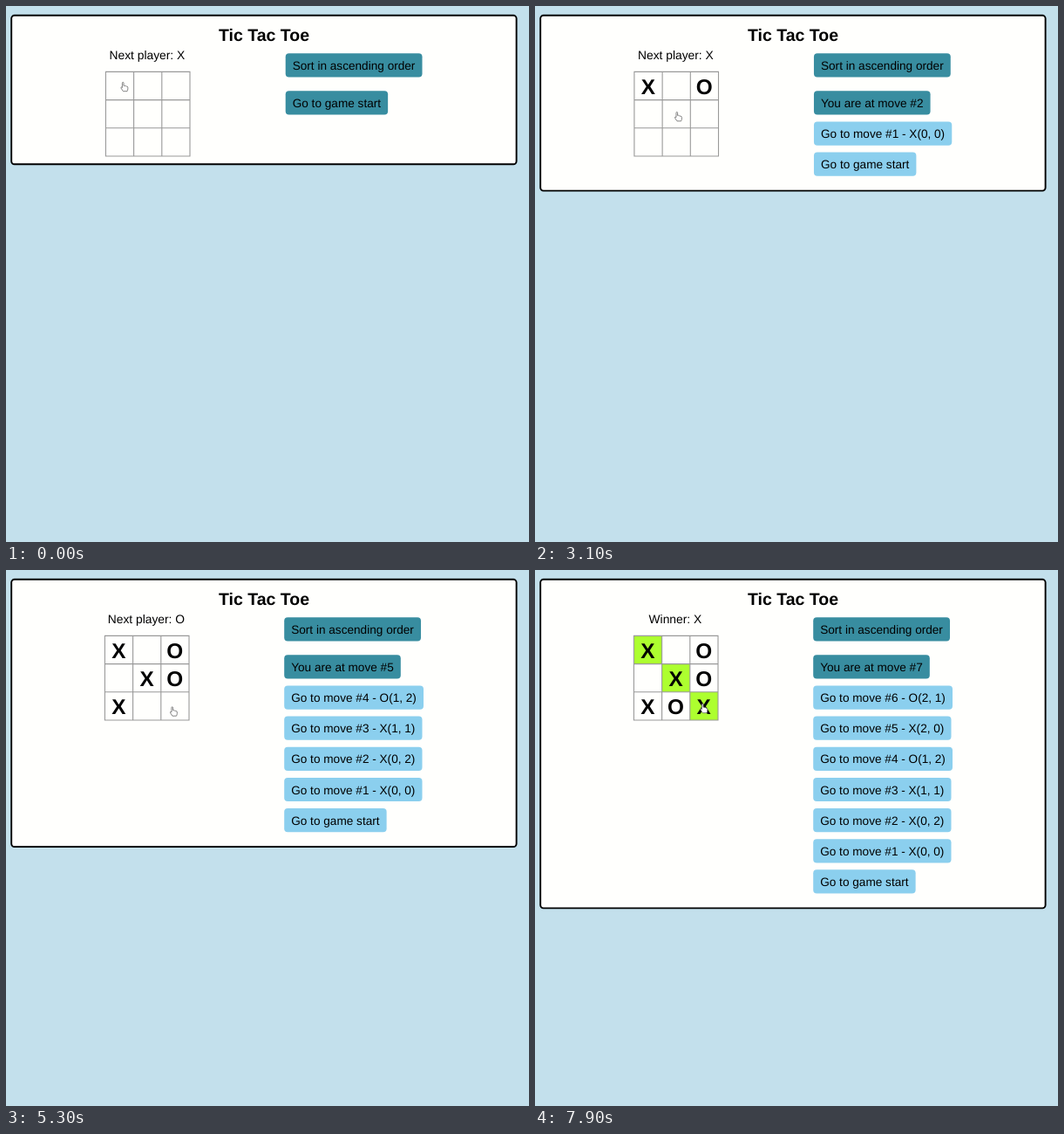
An HTML page that plays this animation: 600x614 px, repeating every 8 s.

```html
<!DOCTYPE html>
<html lang="en">
<head>
<meta charset="utf-8">
<title>Tic Tac Toe</title>
<style>
  html, body { margin: 0; width: 100%; height: 100%; overflow: hidden; background: #c3e0ec; }
  svg { display: block; }
  text { font: 13.62px "Liberation Sans", Arial, sans-serif; fill: #000; text-rendering: geometricPrecision; }
  .title { font-size: 19.5px; font-weight: bold; text-anchor: middle; }
  .mark { font-size: 24.3px; font-weight: bold; text-anchor: middle; }
  .status { font-size: 13.8px; text-anchor: middle; }
  .panel { fill: #fffffd; stroke: #000; stroke-width: 1.9; }
  .grid { fill: none; stroke: #999; stroke-width: 1.1; }
  .win { fill: #adff2f; }
  .on { fill: #388da0; }
  .off { fill: #8bcfee; }
  .hand { fill: #fff; stroke: #666; stroke-width: .8; stroke-linejoin: round; }
</style>
</head>
<body>
<svg width="600" height="614" viewBox="0 0 600 614">
  <g id="game"></g>
  <path id="hand" class="hand" d="M-2.6 1V-4.2Q-2.6 -5.2 -1.8 -5.2T-1 -4.2V-1.2Q.2 -1.8 .7 -.8Q1.8 -1.3 2.3 -.3Q3.8 -.6 3.8 .8V2.4Q3.8 3.8 3 5.2H-1.6L-4 1.6Q-4.4 .4 -3.4 .4Z"/>
</svg>
<script>
const LOOP = 8000, STEP = 100;
const LEFT = 114.4, TOP = 75.4, CELL = 32.2, ROW = 35.15;

// the pointer glides from stop to stop and clicks the square it reaches
const stops = [
  { t: 0, x: 136, y: 92.5 },
  { t: 1600, x: 132.5, y: 94.6, click: true },
  { t: 2100, x: 184.3, y: 109.7, click: true },
  { t: 3300, x: 163, y: 128, click: true },
  { t: 3900, x: 201, y: 129.5, click: true },
  { t: 5000, x: 131, y: 161, click: true },
  { t: 5300, x: 192.5, y: 162, },
  { t: 6700, x: 152.5, y: 165, click: true },
  { t: 7400, x: 194, y: 158.5, click: true }
];
const moves = stops.filter(s => s.click).map(s => ({
  t: s.t,
  row: Math.floor((s.y - 5 - TOP) / CELL),
  col: Math.floor((s.x - 2 - LEFT) / CELL)
}));

const game = document.getElementById('game');
const hand = document.getElementById('hand');

const text = (x, y, s, cls = '') => `<text class="${cls}" x="${x}" y="${y}">${s}</text>`;
const rect = (x, y, w, h, cls, r = 0) =>
  `<rect class="${cls}" x="${x}" y="${y}" width="${w}" height="${h}" rx="${r}"/>`;

const ruler = document.createElement('canvas').getContext('2d');
ruler.font = '100px "Liberation Sans", Arial, sans-serif';
const measure = s => ruler.measureText(s).width * .1362;

const button = (x, y, s, cls) =>
  rect(x, y, measure(s) + 16, 27.2, cls, 4) + text(x + 8, y + 18.6, s);

function board(n, x) {
  const won = n === moves.length;
  let out = '', lines = '';
  if (won) for (let i = 0; i < 3; i++) out += rect(x + i * CELL, TOP + i * CELL, CELL, CELL, 'win');
  for (let i = 0; i < 4; i++) {
    const d = i * CELL;
    lines += `M${x + d} ${TOP - .5}v${3 * CELL + 1}M${x - .5} ${TOP + d}h${3 * CELL + 1}`;
  }
  out += `<path class="grid" d="${lines}"/>`;
  moves.slice(0, n).forEach(({ row, col }, i) => {
    out += text(x + (col + .5) * CELL - .2, TOP + row * CELL + 25.2, 'XO'[i % 2], 'mark');
  });
  const status = won ? 'Winner: X' : 'Next player: ' + 'XO'[n % 2];
  return out + text(x + 1.5 * CELL - .8, 61, status, 'status');
}

function labels(n) {
  const out = n ? ['You are at move #' + n] : [];
  for (let i = n - 1; i > 0; i--) {
    const { row, col } = moves[i - 1];
    out.push(`Go to move #${i} - ${i % 2 || i < 3 ? 'X' : 'O'}(${row}, ${col})`);
  }
  return [...out, 'Go to game start'];
}

function draw(n) {
  const sort = 'Sort in ascending order', rows = labels(n);
  // wider labels push both columns left
  const shift = (Math.max(...[sort, ...rows].map(measure)) - measure(sort)) / 2;
  const x = 320.7 - shift;
  const bottom = Math.max(181.3, 141.3 + n * ROW);
  game.innerHTML = rect(6.2, 10.8, 579.4, bottom - 10.8, 'panel', 3.5) +
    text(296.1, 39.7, 'Tic Tac Toe', 'title') +
    board(n, LEFT - shift * .67) +
    button(x, 54.3, sort, 'on') +
    rows.map((s, i) => button(x, 97.3 + i * ROW, s, i ? 'off' : 'on')).join('');
}

function pointer(t) {
  const i = stops.findLastIndex(s => s.t <= t);
  const a = stops[i], b = stops[i + 1] || { ...a, t: LOOP };
  const k = (t - a.t) / (b.t - a.t), e = k * k * (3 - 2 * k);
  hand.setAttribute('transform', `translate(${a.x + (b.x - a.x) * e} ${a.y + (b.y - a.y) * e})`);
}

let shown = -1;
const start = performance.now();
function tick() {
  const t = Math.floor((performance.now() - start) % LOOP / STEP) * STEP;
  const n = moves.filter(m => m.t <= t).length;
  if (n !== shown) draw(shown = n);
  pointer(t);
  requestAnimationFrame(tick);
}
tick();
</script>
</body>
</html>
```
